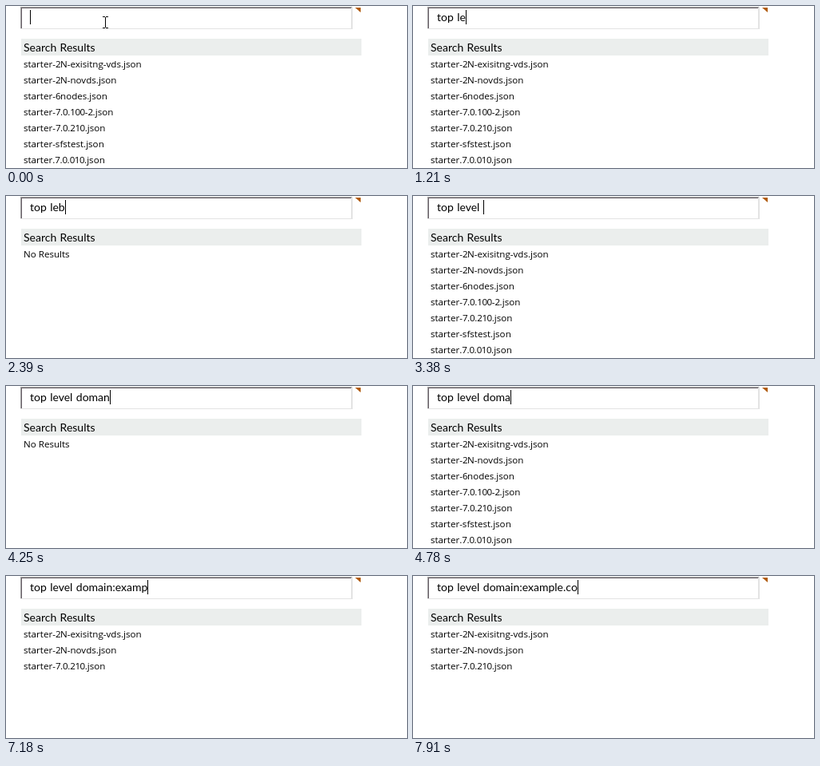
An HTML page that plays this animation: 502 by 203 pixels, repeating every 7.99 s.

```html
<!DOCTYPE html>
<html lang="en">
<head>
<meta charset="utf-8">
<title>Search box</title>
<style>
  html, body { margin: 0; width: 100%; height: 100%; overflow: hidden; background: #fff; }
  svg { display: block; width: 502px; height: 203px; }
  text { white-space: pre; fill: #000; }
  .label { font: 14px Lato, sans-serif; word-spacing: .8px; }
  .row { font: 11.6px "Open Sans", sans-serif; }
  .num { letter-spacing: -.5px; }
</style>
</head>
<body>
<svg viewBox="0 0 502 203">
  <g shape-rendering="crispEdges">
    <path d="M18 1h416v28H18z" fill="#e3e3e3"/>
    <path d="M18 1h415v1H19v26h-1z" fill="#a0a0a0"/>
    <path d="M19 2h413v1H20v25h-1z" fill="#696069"/>
    <path d="M20 3h412v25H20z" fill="#fff"/>
    <path d="M19 41h426v21H19z" fill="#ebeeed"/>
  </g>
  <path d="M437 2h7v6z" fill="#b05a0c"/>
  <text class="label" x="22" y="57">Search Results</text>
  <text class="label" id="query" x="30" y="19"></text>
  <rect id="caret" y="5" width="1" height="18" shape-rendering="crispEdges"/>
  <path id="pointer" d="M121 13.5h3m1 0h3M124.5 14v13M121 27.5h3m1 0h3" stroke="#000" fill="none"/>
  <g id="list"></g>
</svg>
<script>
const LOOP = 7990;
const ALL = ["2N-exisitng-vds", "2N-novds", "6nodes", "7.0.100-2", "7.0.210", "sfstest"]
  .map(s => `starter-${s}.json`).concat("starter.7.0.010.json");
const NONE = ["No Results"];
const MATCH = [ALL[0], ALL[1], ALL[4]];

// [time, keys typed ("<" deletes one character), new results]
const steps = [
  [0, "", ALL], [260, "t"], [340, "o"], [410, "p"], [810, " "],
  [1080, "l"], [1210, "e"], [1340, "b"], [1400, "e", NONE], [1540, "l"], [1730, " "],
  [2130, "<"], [2260, "<"], [2390, "<"], [2590, "<", ALL], [2690, "v"], [2780, "e"],
  [2920, "l"], [3380, " "], [3520, "d"], [3620, "o"], [3710, "m"], [4050, "a"],
  [4250, "n", NONE], [4780, "<", ALL], [5120, "i"], [5190, "n"], [5570, ":"],
  [6100, "e"], [6170, "", MATCH], [6320, "x"], [6650, "a"], [6910, "m"],
  [7180, "p"], [7290, "l"], [7390, "e"], [7580, "."], [7710, "c"], [7910, "o"]
];

let typed = "", found = ALL;
const states = steps.map(([time, key, results]) => {
  typed = key === "<" ? typed.slice(0, -1) : typed + key;
  found = results || found;
  return { time, typed, found };
});

const [query, caret, pointer, list] =
  ["query", "caret", "pointer", "list"].map(id => document.getElementById(id));
const row = (name, i) => `<text class="row" x="22" y="${77 + 20 * i}">` +
  name.replace(/\d+/g, '<tspan class="num">$&</tspan>') + "</text>";

let shown;
function draw(state) {
  query.textContent = state.typed;
  const width = state.typed ? query.getComputedTextLength() : 0;
  caret.setAttribute("x", Math.round(30 + width));
  pointer.style.display = state.time ? "none" : "";
  if (!shown || shown.found !== state.found) list.innerHTML = state.found.map(row).join("");
  shown = state;
}

function tick() {
  const t = performance.now() % LOOP;
  const state = states.findLast(s => s.time <= t);
  if (state !== shown) draw(state);
  requestAnimationFrame(tick);
}
tick();
</script>
</body>
</html>
```
